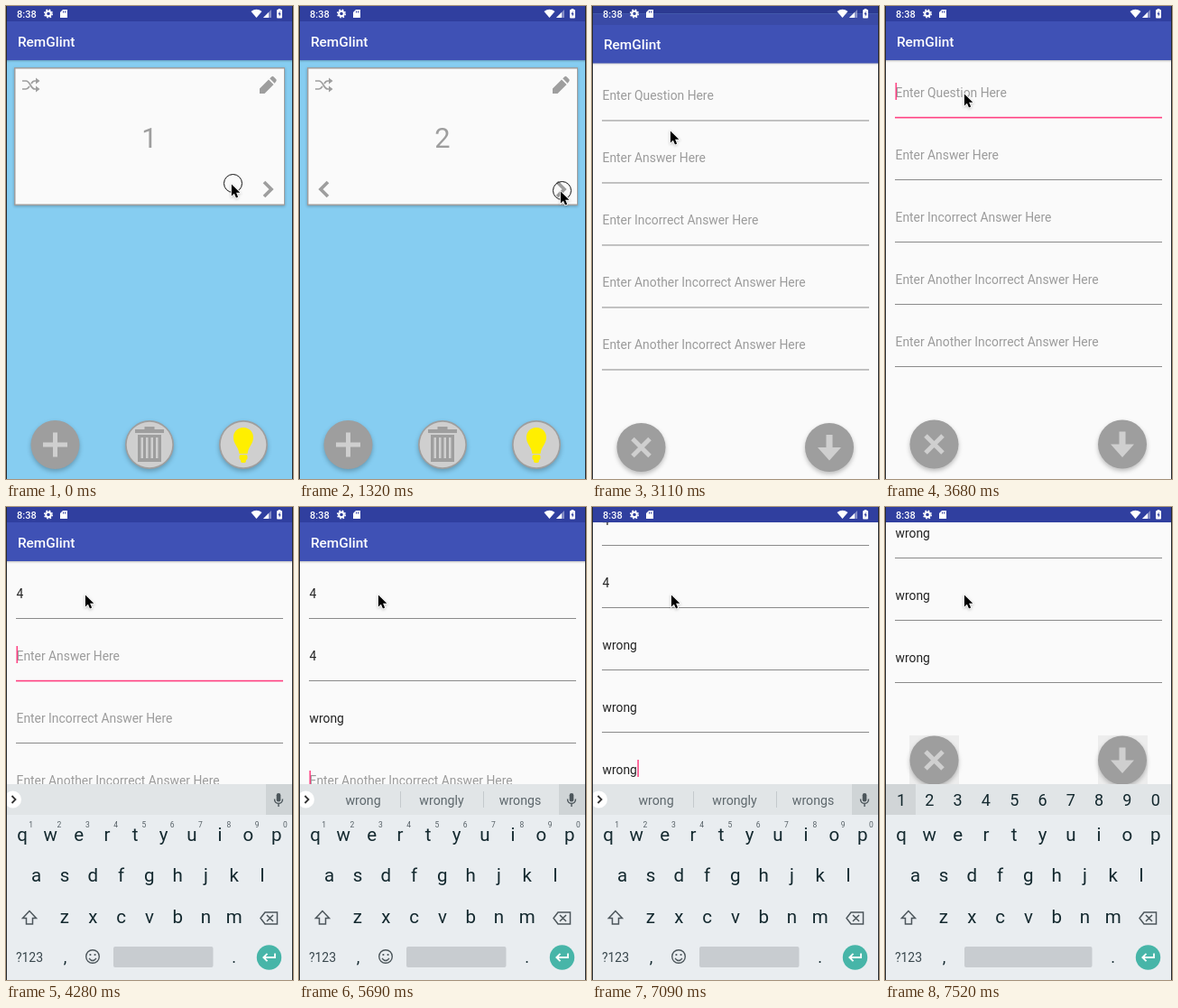
An HTML page with a canvas for the animation above (7990 ms loop, 318 px wide and 524 px high).

```html
<!DOCTYPE html>
<html lang="en">
<head>
<meta charset="utf-8">
<title>Flash cards</title>
<style>
html, body { margin: 0; width: 100%; height: 100%; overflow: hidden; background: #fafafa; }
canvas { display: block; width: 318px; height: 524px; }
</style>
</head>
<body>
<canvas width="318" height="524"></canvas>
<script>
const LOOP = 7990, W = 318, H = 524, GRAY = '#9e9e9e', LIGHT = '#cfcfcf', INK = '#14292f';
const canvas = document.querySelector('canvas');
const c = canvas.getContext('2d');
const dpr = window.devicePixelRatio || 1;
canvas.width = W * dpr;
canvas.height = H * dpr;

// ---- timing helpers ----
const clamp = x => Math.min(1, Math.max(0, x));
const span = (t, from, to) => clamp((t - from) / (to - from));
const smooth = x => x * x * (3 - 2 * x);
const within = (t, a, b) => t >= a && t < b;

function bezier(x, x0, y0, x1, y1, x2, y2, x3, y3) {
  const at = (u, a, b, d, e) => { const v = 1 - u; return v*v*v*a + 3*v*v*u*b + 3*v*u*u*d + u*u*u*e; };
  let lo = 0, hi = 1;
  for (let i = 0; i < 24; i++) {
    const mid = (lo + hi) / 2;
    if (at(mid, x0, x1, x2, x3) < x) lo = mid; else hi = mid;
  }
  return at(lo, y0, y1, y2, y3);
}
const slideEase = x => bezier(x, 0, 0, .4, 0, .2, 1, 1, 1);
const revealEase = x => x < 1 / 6
  ? bezier(x, 0, 0, .05, 0, .1333, .06, .1667, .4)
  : bezier(x, .1667, .4, .2083, .82, .25, 1, 1, 1);
const viscous = x => {
  const f = v => v < 1 ? v - 1 + Math.exp(-v) : .3679 + .6321 * (1 - Math.exp(1 - v));
  return f(8 * x) / f(8);
};

// ---- script of the session ----
const OPEN = 2873, BLUR = 7300;
const fields = [
  { hint: 'Enter Question Here', text: '4', focus: 3550, type: 4200 },
  { hint: 'Enter Answer Here', text: '4', focus: 4250, type: 4450 },
  { hint: 'Enter Incorrect Answer Here', text: 'wrong', focus: 4510, type: 5280 },
  { hint: 'Enter Another Incorrect Answer Here', text: 'wrong', focus: 5690, type: 5980 },
  { hint: 'Enter Another Incorrect Answer Here', text: 'wrong', focus: 6565, type: 6860 }
];
const KEY_GAP = 55;
const caretResets = fields.flatMap(f => [f.focus, ...[...f.text].map((_, i) => f.type + i * KEY_GAP)]);
const pans = [[5690, 12], [6565, 69], [BLUR, 124]];
const presses = [[0, 30], [780, 930], [1320, 1470], [2710, 2920], [3400, 3550]];
const moves = [
  [30, 249, 196], [380, 289, 208], [580, 289, 208], [780, 289, 204], [2160, 289, 204],
  [2510, 61.5, 465.5], [2690, 58, 470], [2920, 58, 470], [3110, 86, 137], [3330, 87, 96]
];

function pointer(t) {
  let i = moves.findIndex(m => m[0] > t);
  if (i < 0) return moves[moves.length - 1].slice(1);
  if (!i) return moves[0].slice(1);
  const [t0, x0, y0] = moves[i - 1], [t1, x1, y1] = moves[i];
  const p = smooth(span(t, t0, t1));
  return [x0 + (x1 - x0) * p, y0 + (y1 - y0) * p];
}

// ---- drawing helpers ----
function rect(x, y, w, h, color) { c.fillStyle = color; c.fillRect(x, y, w, h); }
function text(s, x, y, size, color, align = 'left', weight = 400) {
  c.font = `${weight} ${size}px Roboto, sans-serif`;
  c.textAlign = align;
  c.fillStyle = color;
  c.fillText(s, x, y);
}
function disc(x, y, r, color) {
  c.beginPath();
  c.arc(x, y, r, 0, 7);
  c.fillStyle = color;
  c.fill();
}
function ring(x, y, r, color, width = 1) {
  c.beginPath();
  c.arc(x, y, r, 0, 7);
  c.strokeStyle = color;
  c.lineWidth = width;
  c.stroke();
}
function line(d, color, width) {
  c.strokeStyle = color;
  c.lineWidth = width;
  c.stroke(new Path2D(d));
}
function shape(d, color) { c.fillStyle = color; c.fill(new Path2D(d)); }
function box(x, y, w, h, r, color) {
  c.beginPath();
  c.roundRect(x, y, w, h, r);
  c.fillStyle = color;
  c.fill();
}
function group(draw) { c.save(); draw(); c.restore(); }
function shadowed(blur, dy, draw) {
  group(() => {
    c.shadowColor = 'rgba(0,0,0,.25)';
    c.shadowBlur = blur * dpr;
    c.shadowOffsetY = dy * dpr;
    draw();
  });
}

// ---- screens ----
function appBar() {
  shadowed(2, .5, () => rect(0, 17, W, 43, '#3f51b5'));
  text('RemGlint', 13, 45, 15.4, '#fff', 'left', 500);
}
const statusBack = () => rect(0, 0, W, 17, '#303f9f');

function roundButton(x, y, fill) {
  shadowed(5, 2.5, () => disc(x, y, 27, GRAY));
  if (fill) disc(x, y, 25.3, fill);
}

function deck(t) {
  const n = t < 960 ? 1 : t < 1530 ? 2 : 3;
  rect(0, 0, W, H, '#86cdf1');
  statusBack();
  appBar();
  shadowed(3, 1, () => rect(9, 68, 300, 153, GRAY));
  rect(10.5, 69.5, 297.5, 150, '#fafafa');
  text(n, 158.8, 157, 30.8, GRAY, 'center');
  line('M18 83H22C27 83 27 92 32 92H35M18 92H22C24 92 25 90.500 26 89M28 86C29 84 30 83 32 83H35', GRAY, 1.7);
  shape('M33 79.500L37.500 83L33 86.500ZM33 88.500L37.500 92L33 95.500Z', GRAY);
  shape('M281 97V91.500L291 81.500L296.500 87L286.500 97ZM292.200 80.300L294.400 78.200Q295.400 77.500 296.400 78.200L299.400 81.200Q300 82.200 299.400 83.200L297.600 85.700Z', GRAY);
  if (n < 3) line('M286 195L294 203L286 211', GRAY, 3.7);
  if (n > 1) line('M32 195L24 203L32 211', GRAY, 3.7);

  roundButton(54.5, 486);
  line('M41 486H68M54.500 472.500V499.500', LIGHT, 5);

  roundButton(159, 486, LIGHT);
  rect(153.5, 466, 11, 3, GRAY);
  rect(143, 469, 32, 4, GRAY);
  rect(146, 475, 26, 30, GRAY);
  for (let i = 0; i < 4; i++) rect(149.5 + i * 5.5, 478, 2.5, 23, LIGHT);

  roundButton(263, 486, LIGHT);
  shape('M263 467C256 467 252 472 252 478C252 485 257.500 488 258.500 496H267.500C268.500 488 274 485 274 478C274 472 270 467 263 467Z', '#ffef00');
  box(258.5, 497, 9, 6, 2, '#ffef00');
  box(260, 502, 6, 4, 2, '#ffef00');
}

function form(t) {
  const pan = pans.reduce((sum, [start, dy]) => sum + dy * viscous(span(t, start, start + 250)), 0);
  const active = t < BLUR ? fields.filter(f => f.focus <= t).pop() : null;
  const reset = Math.max(...caretResets.filter(e => e <= t));
  rect(0, 0, W, H, '#fafafa');
  group(() => {
    c.translate(0, -Math.round(pan));
    appBar();
    fields.forEach((f, i) => {
      const y = 100 + 69 * i;
      const typed = f.text.slice(0, Math.max(0, Math.floor((t - f.type) / KEY_GAP) + 1));
      text(typed || f.hint, 11.5, y + .5, 13.86, typed ? '#222' : '#9b9b9b');
      if (f === active) {
        rect(11, y + 22.8, 296, 1.6, '#ff4081');
        if ((t - reset) % 1000 < 500) rect(11.5 + (typed && c.measureText(typed).width + .5), y - 15, 1.5, 19, '#ff4081');
      } else rect(11, y + 23, 296, 1, '#8a8a8a');
    });
    if (t >= BLUR) [27, 236].forEach(x => rect(x, 458, 55, 55, '#ededed'));
    roundButton(54.5, 485.5);
    line('M45 476L64 495M64 476L45 495', LIGHT, 5);
    roundButton(263, 485.5);
    shape('M259.500 471.500H266.500V485.500H276L263 500L250 485.500H259.500Z', LIGHT);
  });
  statusBack();
}

function keyboard(t) {
  const p = span(t, 3715, 3810);
  if (!p) return;
  const plain = t >= 7340;
  const keyX = i => 18 + 31.3 * i;
  group(() => {
    c.globalAlpha = p;
    c.translate(0, 22 * (1 - slideEase(p)));
    rect(0, 307, W, 217, '#e9edf0');
    rect(0, 307, W, 34, '#e1e5e7');
    if (plain) {
      rect(1, 307, 33, 34, '#d1d5d7');
      [...'1234567890'].forEach((k, i) => text(k, keyX(i), 331, 18, INK, 'center'));
    } else {
      rect(288, 307, 29, 34, '#cfd4d6');
      box(299.7, 317, 4.6, 9.5, 2.3, '#4c565b');
      line('M297.500 323.500C297.500 330 306.500 330 306.500 323.500M302 328.500V332', '#4c565b', 1.4);
      disc(7.5, 324, 9.5, '#fff');
      line('M6.500 320L10.500 324L6.500 328', '#333', 1.8);
      if (t >= 5540) {
        ['wrong', 'wrongly', 'wrongs'].forEach((s, i) => text(s, 71 + 87 * i, 329.5, 14.2, '#5d676c', 'center'));
        [112, 204].forEach(x => rect(x, 315, 1, 18, '#c4c9cc'));
      }
    }
    [...'qwertyuiop'].forEach((k, i) => {
      text(k, keyX(i), 370, 20.5, INK, 'center');
      if (!plain) text((i + 1) % 10, keyX(i) + 9.7, 355, 8.5, '#566066', 'center');
    });
    [...'asdfghjkl'].forEach((k, i) => text(k, keyX(i + .5), 415, 20.5, INK, 'center'));
    [...'zxcvbnm'].forEach((k, i) => text(k, keyX(i + 1.5), 460.5, 20.5, INK, 'center'));
    line('M26 447.500L18.500 455.500H22.500V462H29.500V455.500H33.500Z', '#4c565b', 1.5);
    line('M287 449H300.500V462H287L282 455.500ZM289 452L296 459M296 452L289 459', '#4c565b', 1.5);
    text('?123', 26, 503.5, 14, '#39474d', 'center');
    text(',', 65.5, 505, 18, INK, 'center');
    text('.', 252.5, 505, 18, INK, 'center');
    if (!plain) {
      ring(96, 498, 7.3, '#4c565b', 1.4);
      disc(93.4, 496, 1.1, '#4c565b');
      disc(98.6, 496, 1.1, '#4c565b');
      line('M92 500Q96 505 100 500', '#4c565b', 1.3);
    }
    const left = plain ? 88 : 119;
    box(left, 487, 229.5 - left, 23, 2, '#c8ccd0');
    disc(291.5, 499, 13.7, '#47b5a8');
    line('M298 494.500V499H285.500M289.500 494.800L285.300 499L289.500 503.200', '#fff', 1.8);
  });
}

function statusIcons() {
  text('8:38', 12, 12.5, 11, '#fff', 'left', 500);
  ring(47, 8.5, 2.8, '#fff', 2);
  group(() => {
    c.setLineDash([1.7, 1.7]);
    ring(47, 8.5, 4.3, '#fff', 1.5);
  });
  shape('M63 4H68V13H60V7Z', '#fff');
  rect(63, 5.5, 1, 2, '#303f9f');
  rect(65, 5.5, 1, 2, '#303f9f');
  shape('M271.500 6Q277.500 1.500 283.500 6L277.500 13Z', '#fff');
  shape('M294 4V13H285Z', 'rgba(255,255,255,.4)');
  shape('M291 7V13H285Z', '#fff');
  box(300, 4, 6, 9.5, 1, '#fff');
  rect(301.7, 3, 2.6, 1.5, '#fff');
  shape('M303.500 5.500L301.500 9.200H302.800V12L304.600 8.300H303.500Z', '#303f9f');
}

function cursor(t) {
  const [x, y] = pointer(t);
  if (presses.some(([a, b]) => within(t, a, b))) ring(x + 2.5, y + .5, 10, '#111', 1);
  group(() => {
    c.translate(x + .5, y + 1.5);
    c.scale(.82, .82);
    const arrow = 'M.5 0V15.800L4.200 12.400L6.700 18.200L9.300 17.100L6.800 11.400H12Z';
    shadowed(3, 1, () => line(arrow, '#fff', 1.8));
    shape(arrow, '#000');
  });
}

function draw(t) {
  c.setTransform(dpr, 0, 0, dpr, 0, 0);
  const p = t < 2920 ? 0 : span(t, OPEN, OPEN + 425);
  const slide = slideEase(p);
  if (p < 1) group(() => {
    c.translate(0, -.02 * H * slide);
    deck(t);
    rect(0, 0, W, H, `rgba(0,0,0,${.1 * slide})`);
  });
  if (p > 0) group(() => {
    c.translate(0, .041 * H * (1 - slide));
    c.beginPath();
    c.rect(0, .959 * H * (1 - revealEase(p)), W, H);
    c.clip();
    form(t);
  });
  statusIcons();
  keyboard(t);
  rect(0, 0, 1, H, '#25282c');
  rect(317, 0, 1, H, '#25282c');
  cursor(t);
}

let begin;
function tick(now) {
  begin ??= now;
  draw((now - begin) % LOOP);
  requestAnimationFrame(tick);
}
requestAnimationFrame(tick);
</script>
</body>
</html>
```
